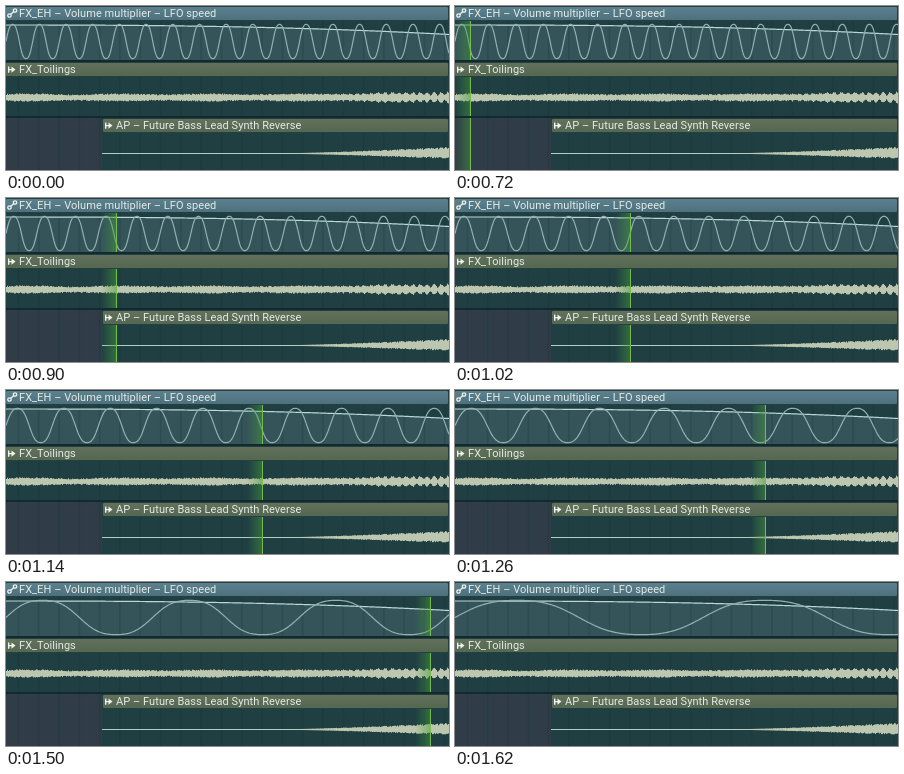
Write an HTML page that moves like this. It is 443 px wide and 164 px high and loops after 2.22 s.

```html
<!DOCTYPE html>
<html lang="en">
<head>
<meta charset="utf-8">
<title>Playlist</title>
<style>
  html, body { margin: 0; width: 100%; height: 100%; overflow: hidden; background: #102a2f; }
  svg { display: block; }
  text { font: 11px Roboto, sans-serif; letter-spacing: .06px; fill: #e3ebe5; }
</style>
</head>
<body>
<svg width="443" height="164" viewBox="0 0 443 164">
  <defs>
    <linearGradient id="blue" x2="0" y2="1">
      <stop stop-color="#5d828e"/><stop offset="1" stop-color="#4c707d"/>
    </linearGradient>
    <linearGradient id="olive" x2="0" y2="1">
      <stop stop-color="#62715c"/><stop offset="1" stop-color="#556750"/>
    </linearGradient>
    <linearGradient id="glow">
      <stop stop-color="#3f9a35" stop-opacity="0"/><stop offset="1" stop-color="#4a9a3a" stop-opacity=".5"/>
    </linearGradient>
    <pattern id="grid" width="20.3" height="164" patternUnits="userSpaceOnUse">
      <path d="M12.5 0V164" stroke="#0c282c" stroke-opacity=".35"/>
    </pattern>
    <g id="arrow" fill="#eef4ec">
      <path d="M2 4.5H3.4V7H5.5V4.5L9.5 7.6L5.5 10.7V8.3H3.4V10.7H2Z"/>
    </g>
  </defs>

  <!-- clip bodies -->
  <path d="M0 14H443V54H0Z M0 70H443V110H0Z M96 126H443V164H96Z" fill="#1f3f43"/>
  <path id="fill" fill="#34545a"/>
  <rect y="112" width="96" height="52" fill="#303d49"/>
  <rect y="14" width="443" height="150" fill="url(#grid)"/>

  <path id="level" fill="none" stroke="#bcd6d7" stroke-width="1.2"/>
  <path id="wave" fill="none" stroke="#93afb2" stroke-width="1.2"/>
  <path d="M96 147.5H443" stroke="#b4cdc0"/>
  <path id="audio" stroke="#bdc6ae"/>

  <g id="head">
    <rect x="-15" y="15" width="15" height="149" fill="url(#glow)"/>
    <path d="M.5 15V164" stroke="#72bd4e"/>
  </g>

  <!-- gaps and title bars -->
  <path d="M0 55H443M0 111H443" stroke="#102a2f" stroke-width="2"/>
  <g stroke="#263f40">
    <rect x="-.5" y=".5" width="443" height="14" rx="1.5" fill="url(#blue)"/>
    <rect x="-.5" y="56.5" width="443" height="14" rx="1.5" fill="url(#olive)"/>
    <rect x="96.5" y="112.5" width="346" height="14" rx="1.5" fill="url(#olive)"/>
  </g>
  <g fill="none" stroke="#eef4ec" stroke-width="1.3">
    <circle cx="3.5" cy="9.5" r="1.7"/><circle cx="9" cy="4.5" r="1.7"/><path d="M4.8 8.3L7.7 5.7"/>
  </g>
  <use href="#arrow" y="56"/>
  <use href="#arrow" x="97" y="112"/>
  <text x="13" y="11">FX_EH – Volume multiplier – LFO speed</text>
  <text x="13" y="67">FX_Toilings</text>
  <text x="110" y="123">AP – Future Bass Lead Synth Reverse</text>
</svg>
<script>
const LOOP = 2220, STEP = 60, START = 720, END = 1620, WIDTH = 443;
const headKeys = [[720, 15], [900, 110], [1020, 175], [1140, 256], [1380, 362], [1620, 488]];
const cycleKeys = [[0, 16.6], [15, 16.3], [110, 14.38], [175, 12.65], [256, 9.57], [362, 4.57], [488, 1.786]];
const el = id => document.getElementById(id);
const noise = n => { const v = Math.sin(n * 12.9898) * 43758.5453; return v - Math.floor(v); };

// Smooth curve through [x, y] keys
function spline(keys, x) {
  const last = keys.length - 1;
  const slope = k => {
    const a = keys[Math.max(k - 1, 0)], b = keys[Math.min(k + 1, last)];
    return (b[1] - a[1]) / (b[0] - a[0]);
  };
  let i = 0;
  while (i < last - 1 && x >= keys[i + 1][0]) i++;
  const [x0, y0] = keys[i], [x1, y1] = keys[i + 1];
  const h = x1 - x0, u = Math.min(Math.max((x - x0) / h, 0), 1), w = 1 - u;
  return w * w * (1 + 2 * u) * y0 + u * u * (3 - 2 * u) * y1
    + h * u * w * (w * slope(i) - u * slope(i + 1));
}

function plot(f) {
  let d = "";
  for (let x = 0; x <= WIDTH; x++) d += (x ? "L" : "M") + x + " " + f(x).toFixed(2);
  return d;
}

function drawAudio() {
  let d = "";
  const bar = (x, y, up, down) => { d += `M${x + .5} ${(y - up).toFixed(2)}V${(y + down).toFixed(2)}`; };
  for (let x = 0; x < WIDTH; x++) {
    const swell = Math.max(0, (x - 300) / 143);
    const pulse = 1.5 * swell * Math.sin(x * .9);
    const size = 2.5 + .4 * Math.sin(x * .07) + 1.1 * swell + pulse;
    bar(x, 91.5, size + 1.3 * noise(x), size + 1.3 * noise(x + 900));
    const rise = Math.max(0, (x - 292) / 151) ** 1.2;
    if (rise) bar(x, 147.5, .5 + rise * (4 + 2.2 * noise(x + 50)), .5 + rise * (3.2 + 1.8 * noise(x + 700)));
  }
  el("audio").setAttribute("d", d);
}

// Sine with slightly widened crests
function lfo(phase) {
  const s = Math.sin(2 * Math.PI * phase);
  return s * (1.25 - .25 * s * s);
}

const level = plot(x => 19 + 9.5 * (x / WIDTH) ** 2.5);
el("level").setAttribute("d", level);
el("fill").setAttribute("d", level + "V54H0Z");
drawAudio();

function frame() {
  const time = Math.floor(performance.now() % LOOP / STEP) * STEP;
  const headX = time < START ? 0 : spline(headKeys, Math.min(time, END));
  const cycles = spline(cycleKeys, headX);
  el("wave").setAttribute("d", plot(x => 35.5 - 17.2 * lfo(cycles * x / WIDTH)));
  el("head").setAttribute("transform", `translate(${Math.round(headX)})`);
  el("head").setAttribute("visibility", time >= START && time < END ? "visible" : "hidden");
  requestAnimationFrame(frame);
}
frame();
</script>
</body>
</html>
```
